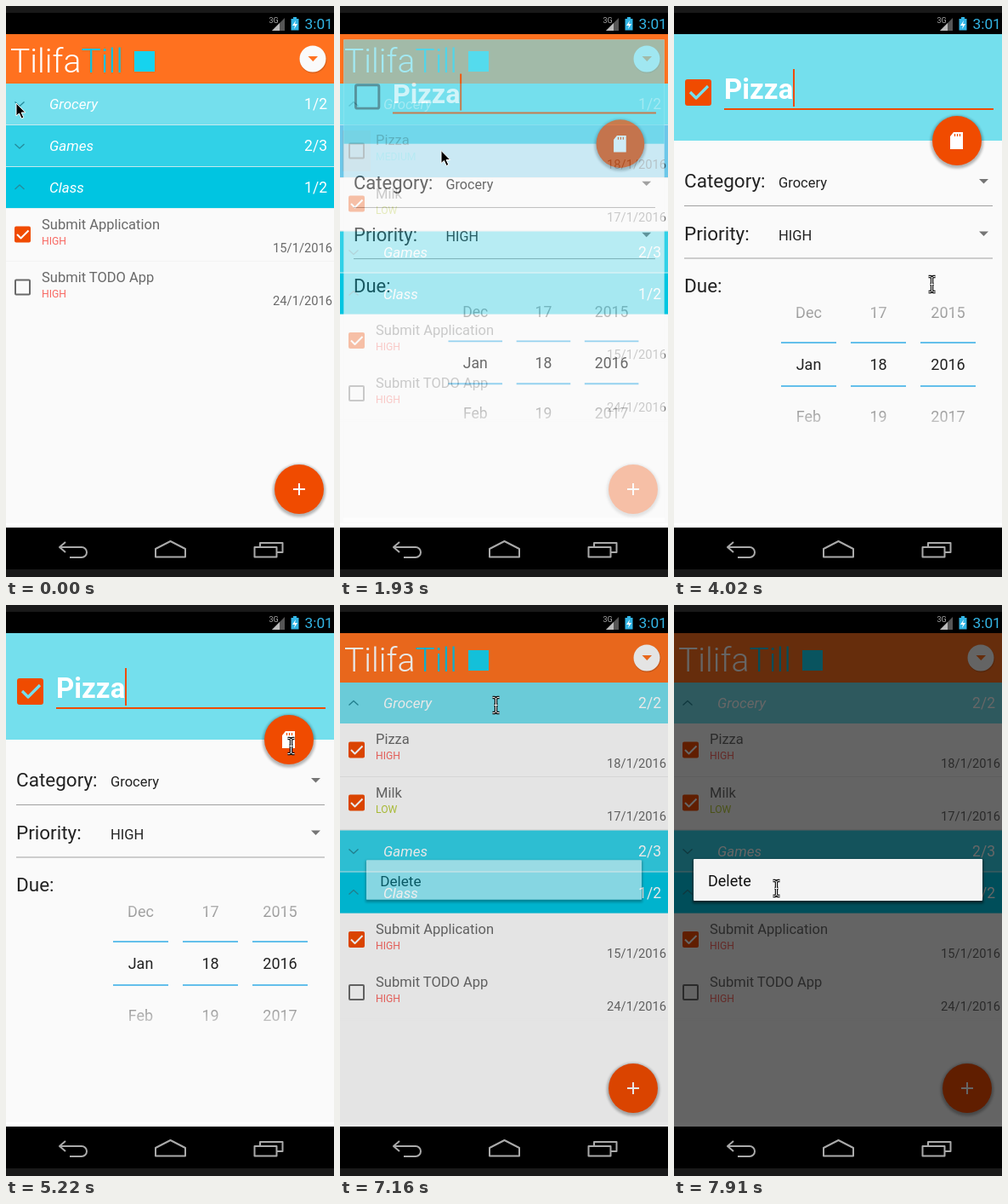
Recreate the animation shown at these times as an HTML page. Size 386 by 670 pixels, loop 8000 ms.

```html
<!DOCTYPE html>
<html lang="en">
<head>
<meta charset="utf-8">
<title>To-do app</title>
<style>
  html, body { margin: 0; height: 100%; overflow: hidden; background: #000; }
  svg { display: block; width: 100vw; height: 100vh; font-family: Roboto, sans-serif; }
  .logo { font-weight: 300; }
  .line { fill: none; stroke-linejoin: round; }
</style>
</head>
<body>
<script>
const LOOP = 8000, STEP = 149;
const ORANGE = '#f04b00', AQUA = '#74dfed', PAPER = '#fafafa', INK = '#00000094';

const rect = (x, y, w, h, fill, extra = '') =>
  `<rect x="${x}" y="${y}" width="${w}" height="${h}" fill="${fill}" ${extra}/>`;
const text = (x, y, size, fill, str, extra = '') =>
  `<text x="${x}" y="${y}" font-size="${size}" fill="${fill}" ${extra}>${str}</text>`;
const line = (d, color, width = 1) =>
  `<path class="line" d="${d}" stroke="${color}" stroke-width="${width}"/>`;
const group = (id, body) => `<g id="${id}">${body}</g>`;
const END = 'text-anchor="end"', MID = 'text-anchor="middle"';

const chevron = (y, up) => {
  const k = up ? 2.5 : -2.5;
  return line(`M10.5 ${y + k}L16 ${y - k}L21.5 ${y + k}`, '#258b9b', 1.3);
};

const header = (y, color, name) =>
  rect(0, y, 386, 48.5, color) + line(`M0 ${y + 48.5}H386`, '#c4e9ee') +
  text(51, y + 30, 17, '#fff', name, 'font-style="italic"');

const count = (y, str) => text(378, y + 30, 17.5, '#fff', str, END);

const box = (cy, checked) => checked
  ? rect(10, cy - 9.5, 19, 19, ORANGE, 'rx="2"') + line(`M13 ${cy}l4.5 4.5 9-9`, '#fff', 2)
  : rect(11, cy - 8.5, 17, 17, 'none', `rx="1" stroke="${INK}" stroke-width="2"`);

const PRIORITY = { HIGH: '#f86a64', MEDIUM: '#2fc9e4', LOW: '#b9cc3c' };
const priority = (y, level) => text(42, y + 42, 12.2, PRIORITY[level], level);

const item = (y, name, date, overlay = '') =>
  rect(0, y, 386, 62.5, PAPER) + overlay + line(`M0 ${y + 62.5}H386`, '#dedede') +
  text(42, y + 24, 16.5, INK, name) + text(384, y + 51.5, 14.7, INK, date, END);

const fab = (x, y, icon) =>
  `<circle cx="${x}" cy="${y + 1.5}" r="31" opacity=".28" filter="url(#soft)"/>
   <circle cx="${x}" cy="${y}" r="29" fill="${ORANGE}"/>${icon}`;

const list =
  rect(0, 33, 386, 579, PAPER) + rect(0, 607, 386, 5, '#fff') +
  rect(0, 33, 386, 58, '#ff711f') +
  `<text class="logo" x="5" y="78" font-size="39" fill="#fff">Tilifa<tspan fill="#10bfdc">Till</tspan></text>` +
  rect(151, 53, 24, 24, '#16d3ee') +
  `<circle cx="361.5" cy="63" r="16" opacity=".15"/><circle cx="361" cy="62" r="15.5" fill="${PAPER}"/>
   <path d="M355.5 59h11.5l-5.7 6z" fill="#ff711f"/>` +
  header(91, AQUA, 'Grocery') +
  group('closed', chevron(115, false) + count(91, '1/2')) +
  group('opened',
    item(139, 'Pizza', '18/1/2016',
      group('pressed', rect(0, 139.5, 386, 62, '#6cc7e9') + rect(3, 146, 33, 48, '#79bcd4'))) +
    chevron(115, true) +
    group('before', count(91, '1/2') + box(170, false) + priority(139, 'MEDIUM')) +
    group('after', count(91, '2/2') + box(170, true) + priority(139, 'HIGH')) +
    item(201.5, 'Milk', '17/1/2016') + box(232, true) + priority(201.5, 'LOW')) +
  group('rest',
    header(140, '#31d1e7', 'Games') + chevron(164.5, false) + count(140, '2/3') +
    header(189, '#00c5e1', 'Class') + chevron(212.5, true) + count(189, '1/2') +
    item(237.5, 'Submit Application', '15/1/2016') + box(268, true) + priority(237.5, 'HIGH') +
    item(299.5, 'Submit TODO App', '24/1/2016') + box(330, false) + priority(299.5, 'HIGH') +
    rect(0, 361, 386, 2, PAPER)) +
  fab(345, 567, line('M338 567h14M345 560v14', '#fff', 2));

const field = (y, label, value) =>
  text(12, y, 22.5, '#222', label) + text(123, y, 16.5, '#222', value) +
  `<path d="M359 ${y - 10}h11l-5.5 5.5z" fill="#757575"/>` + line(`M12 ${y + 21.5}H375`, '#a0a0a0');

const picker = (x, values) =>
  values.map((v, i) => text(x, 366 + 61 * i, 18, i === 1 ? '#222' : 'url(#fade)', v, MID)).join('') +
  line(`M${x - 32.5} 395h65M${x - 32.5} 446h65`, '#64bfeb', 2);

const detail =
  rect(0, 33, 386, 579, PAPER) + rect(0, 607, 386, 5, '#fff') + rect(0, 33, 386, 125, AQUA) +
  group('unticked', rect(14.5, 87.5, 28, 28, 'none', 'rx="2" stroke="#4a6e76" stroke-width="3"')) +
  group('ticked', rect(13, 86, 31, 31, ORANGE, 'rx="3"') + line('M19 101l7 7 14-14', AQUA, 3.2)) +
  text(59, 109, 33, '#fff', 'Pizza', 'font-weight="700"') +
  rect(59, 120, 317, 2, ORANGE) + group('caret', rect(140, 74, 2, 44, ORANGE)) +
  fab(333, 158, '<path d="M329 148h11v20h-15v-15z" fill="#fff"/>' +
    line('M330.5 150v3m3-3v3m3-3v3', ORANGE, 1.2)) +
  field(213, 'Category:', 'Grocery') + field(274.5, 'Priority:', 'HIGH') +
  text(12, 336, 22.5, '#222', 'Due:') +
  picker(158.5, ['Dec', 'Jan', 'Feb']) + picker(240.5, [17, 18, 19]) + picker(322.5, [2015, 2016, 2017]);

const BEAM = 'M-4-9h2.5L0-7.5 1.5-9H4M0-7.5V7.5M-4 9h2.5L0 7.5 1.5 9H4M-2 0H2';

const system =
  rect(0, 0, 386, 33, '#000') + rect(0, 0, 386, 8, '#191919') +
  rect(0, 612, 386, 58, '#000') + rect(0, 661, 386, 9, '#191919') +
  text(309.5, 20, 9, '#aaa', '3G') +
  '<path d="M328 14v15h-15z" fill="#555"/><path d="M322 20v9h-9z" fill="#bbb"/>' +
  rect(338, 13, 4, 3, '#33b5e5') + rect(335.5, 15, 9, 13.5, '#33b5e5') +
  '<path d="M341 17l-4 6h3l-1 4 4-6h-3z" fill="#fff"/>' +
  text(351.5, 27, 17.3, '#33b5e5', '3:01') +
  line('M70 629l-7 6 7 6M63 635H89a6 6 0 0 1 0 12H75', '#aaa', 2) +
  line('M176 637l17.5-9 17.5 9v9.5h-35z', '#aaa', 2) +
  line('M292.5 635h26v11.5h-26zM299 635v-5h26.5v11h-7', '#aaa', 2);

document.body.innerHTML = `<svg viewBox="0 0 386 670" preserveAspectRatio="none">
  <defs>
    <filter id="soft" x="-30%" y="-30%" width="160%" height="160%"><feGaussianBlur stdDeviation="1.5"/></filter>
    <linearGradient id="fade" gradientUnits="userSpaceOnUse" x1="0" y1="346" x2="0" y2="495">
      <stop offset="0" stop-color="#bbb"/><stop offset=".15" stop-color="#959595"/>
      <stop offset=".85" stop-color="#959595"/><stop offset="1" stop-color="#d5d5d5"/>
    </linearGradient>
  </defs>
  ${list}
  ${group('detail', detail)}
  ${group('dim', rect(0, 33, 386, 579, '#000'))}
  ${group('dialog', rect(22, 299, 342, 51, '#000', 'opacity=".5" filter="url(#soft)"') +
    rect(23, 298, 340, 49, '#f4f4f4', 'rx="1"') + text(40, 330, 18, '#111', 'Delete'))}
  ${system}
  ${group('arrow', '<path d="M0 0V15l3.5-3 2.7 6 2.6-1.2-2.7-5.8h4.7z" stroke="#fff"/>')}
  ${group('beam', line(BEAM, '#111', 3.4) + line(BEAM, '#fff', 1))}
</svg>`;

const el = id => document.getElementById(id);
const show = (id, on) => el(id).setAttribute('visibility', on ? 'inherit' : 'hidden');
const fadeScale = (id, alpha, scale) => {
  show(id, alpha > 0);
  el(id).setAttribute('opacity', alpha);
  el(id).setAttribute('transform', `translate(193 322.5) scale(${scale}) translate(-193 -322.5)`);
};
const clamp = v => Math.min(1, Math.max(0, v));

// Pointer stops: [step, x, y]
const stops = [[0, 12, 114], [4, 12, 114], [8, 119, 169.5], [13, 119, 169.5], [14, 122, 174],
  [15, 122, 174], [18, 28.5, 98.5], [23, 28.5, 98.5], [28, 335.5, 353], [31, 335.5, 353],
  [34, 335.5, 165.5], [39, 335.5, 165.5], [42, 183.5, 117.5], [48, 183.5, 117.5], [53, 120.5, 332.5]];

function pointer(n) {
  const i = Math.max(1, stops.findIndex(s => s[0] >= n));
  const [a, b] = [stops[i - 1], stops[i]];
  const p = (n - a[0]) / (b[0] - a[0]), e = p * p * (3 - 2 * p);
  return `translate(${a[1] + (b[1] - a[1]) * e} ${a[2] + (b[2] - a[2]) * e})`;
}

function draw(t) {
  const n = Math.min(53, Math.floor((t + 8) / STEP)); // the screen refreshes in steps
  const open = n >= 1, saved = n >= 36;
  show('closed', !open);
  show('opened', open);
  show('pressed', n >= 10 && n < 14);
  show('before', open && !saved);
  show('after', saved);
  el('rest').setAttribute('transform', `translate(0 ${open ? 124.5 : 0})`);

  const enter = clamp((n - 11) / 3), leave = n === 36 ? 0.4 : +!saved;
  fadeScale('detail', enter * leave, saved ? 0.86 : 0.8 + 0.2 * (1 - (1 - enter) ** 2));
  const detailOn = n >= 12 && n <= 36;
  show('ticked', detailOn && n >= 20);
  show('unticked', detailOn && n < 20);
  show('caret', detailOn && Math.floor((n * STEP + 10 - 1770) / 500) % 2 === 0);

  el('dim').setAttribute('opacity', n < 48 ? 0 : Math.min(0.6, 0.09 + 0.25 * (n - 48)));
  fadeScale('dialog', n < 48 ? 0 : n === 48 ? 0.55 : 1, n === 48 ? 0.953 : 1);

  const beam = n >= 14;
  show('arrow', !beam);
  show('beam', beam);
  el(beam ? 'beam' : 'arrow').setAttribute('transform', pointer(n));
}

(function tick() {
  draw(performance.now() % LOOP);
  requestAnimationFrame(tick);
})();
</script>
</body>
</html>
```
